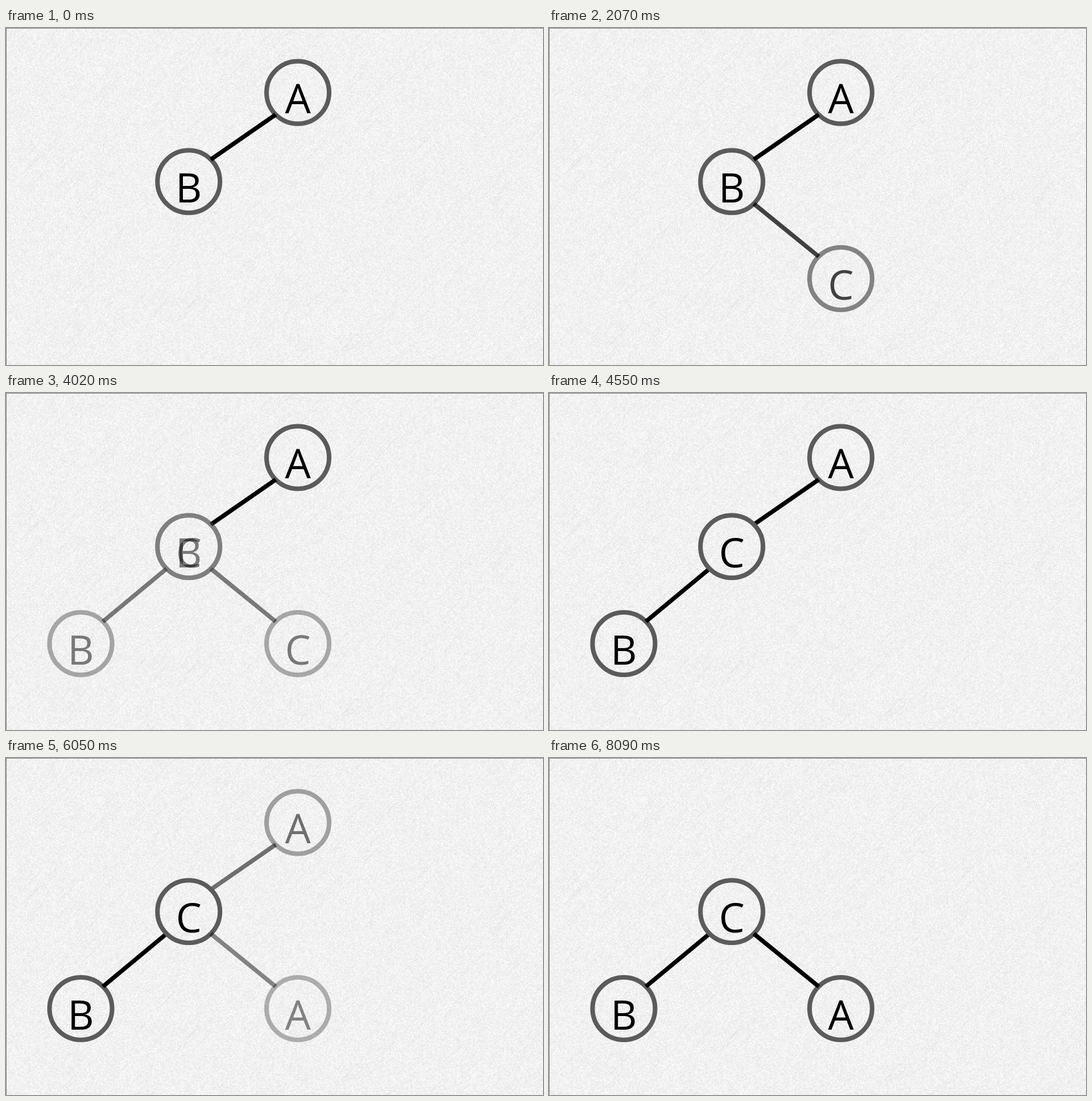
Recreate the animation shown at these times as an HTML page with a canvas. Size 944 by 593 pixels, loop 8860 ms.

```html
<!DOCTYPE html>
<html lang="en">
<head>
<meta charset="utf-8">
<title>Tree rotation</title>
<style>
  html, body { margin: 0; width: 100%; height: 100%; overflow: hidden; background: #f0f0f0; }
  canvas { display: block; }
</style>
</head>
<body>
<canvas id="stage" width="944" height="593"></canvas>
<script>
const W = 944, H = 593, LOOP = 8860;
const RADIUS = 55;
const ctx = document.getElementById('stage').getContext('2d');

const TOP = { x: 513, y: 113.5 };
const MID = { x: 321.2, y: 270.3 };
const LEFT = { x: 131.5, y: 441 };
const RIGHT = { x: 513, y: 441 };

// Each fade advances in hard steps at the listed times.
const FADES = {
  addC: { first: 0.13, step: 0.12, times: [1470, 1590, 1710, 1830, 1950, 2070, 2210, 2330] },
  rotate: { first: 0.06, step: 0.147, times: [3660, 3780, 3900, 4020, 4140, 4280, 4430, 4550] },
  moveA: { first: 0.1, step: 0.12, times: [5690, 5810, 5930, 6050, 6170, 6290, 6430, 6580] }
};

function progress({ first, step, times }, t) {
  const done = times.filter(time => time <= t).length;
  if (done === 0) return 0;
  return done === times.length ? 1 : Math.min(1, first + step * (done - 1));
}

function hash(x, y) {
  let h = Math.imul(x, 374761393) + Math.imul(y, 668265263);
  h = Math.imul(h ^ (h >>> 13), 1274126177);
  return ((h ^ (h >>> 16)) >>> 0) / 4294967296;
}

// Paper grain with faint streaks rising to the right.
function makePaper() {
  const paper = document.createElement('canvas');
  paper.width = W;
  paper.height = H;
  const g = paper.getContext('2d');
  const image = g.createImageData(W, H);
  for (let y = 0; y < H; y++) {
    for (let x = 0; x < W; x++) {
      const fine = hash(x, y) - 0.5;
      const coarse = hash((x >> 1) + 2000, (y >> 1) + 3000) - 0.5;
      const band = (x + y) >> 1;
      const along = (x - y + 1000) / 90 + hash(band, 77);
      const cell = Math.floor(along);
      const strength = Math.max(0, hash(band + 5000, cell) - 0.8) * 5;
      const streak = strength * Math.sin(Math.PI * (along - cell));
      const value = 241.5 + fine * 10 + coarse * 16 - streak * 7;
      const i = (y * W + x) * 4;
      image.data[i] = image.data[i + 1] = image.data[i + 2] = value;
      image.data[i + 3] = 255;
    }
  }
  g.putImageData(image, 0, 0);
  g.fillStyle = '#7c7c7c';
  g.fillRect(0, 0, W, 1);
  g.fillRect(0, 0, 1, H);
  return paper;
}

function node(label, { x, y }, alpha) {
  ctx.globalAlpha = alpha;
  ctx.strokeStyle = '#5b5b5b';
  ctx.lineWidth = 8;
  ctx.beginPath();
  ctx.arc(x, y, RADIUS, 0, Math.PI * 2);
  ctx.stroke();
  ctx.fillStyle = '#000';
  ctx.fillText(label, x, y + 36.5);
}

// Links run between the diagonal points of two rings.
function link(from, to, alpha) {
  const d = RADIUS * Math.SQRT1_2;
  const sx = Math.sign(to.x - from.x) * d;
  const sy = Math.sign(to.y - from.y) * d;
  ctx.globalAlpha = alpha;
  ctx.strokeStyle = '#000';
  ctx.lineWidth = 7.6;
  ctx.beginPath();
  ctx.moveTo(from.x + sx, from.y + sy);
  ctx.lineTo(to.x - sx, to.y - sy);
  ctx.stroke();
}

const paper = makePaper();
ctx.font = '71.5px "Open Sans", "Noto Sans", sans-serif';
ctx.textAlign = 'center';
ctx.textBaseline = 'alphabetic';

function draw(t) {
  const added = progress(FADES.addC, t);
  const rotated = progress(FADES.rotate, t);
  const moved = progress(FADES.moveA, t);
  const lowerC = added * (1 - rotated);

  ctx.globalAlpha = 1;
  ctx.drawImage(paper, 0, 0);
  node('A', TOP, 1 - moved);
  node('B', MID, 1 - rotated);
  link(TOP, MID, 1 - moved);
  node('C', RIGHT, lowerC);
  link(MID, RIGHT, lowerC);
  node('B', LEFT, rotated);
  link(MID, LEFT, rotated);
  node('C', MID, rotated);
  node('A', RIGHT, moved);
  link(MID, RIGHT, moved);
}

const start = performance.now();
function tick() {
  draw((performance.now() - start) % LOOP);
  requestAnimationFrame(tick);
}
tick();
</script>
</body>
</html>
```
